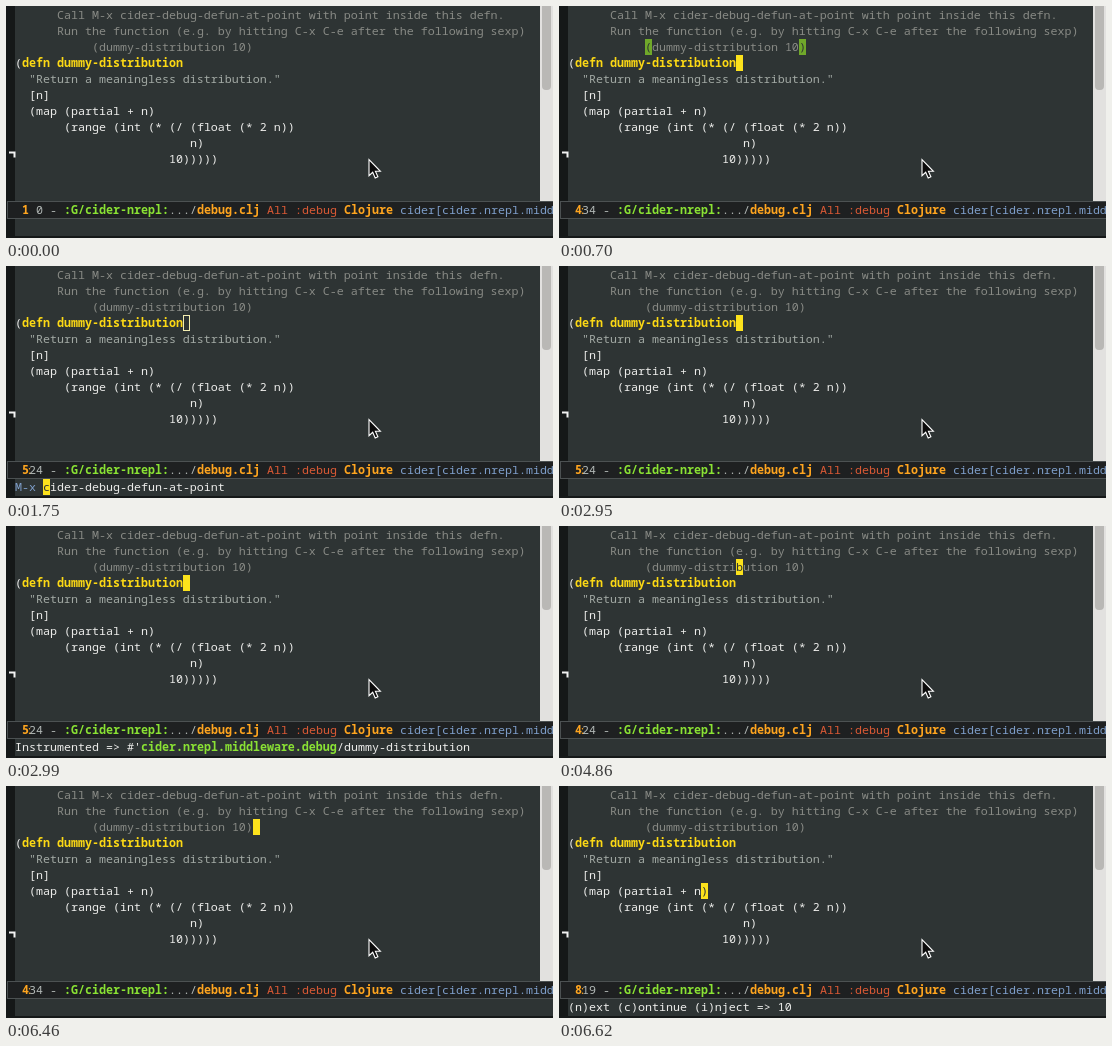
Recreate the animation shown at these times as an HTML page. Size 547 px wide and 232 px high, loop 8 s.

```html
<!DOCTYPE html>
<html lang="en">
<head>
<meta charset="utf-8">
<title>Editor debugging session</title>
<style>
  html, body { margin: 0; width: 100%; height: 100%; overflow: hidden; background: #111; }
  svg { display: block; width: 547px; height: 232px; }
  text { font: 11.6667px "Noto Sans Mono", "DejaVu Sans Mono", monospace; white-space: pre; }
  .b { font-weight: 700; }
</style>
</head>
<body>
<svg id="stage" viewBox="0 0 547 232" xmlns="http://www.w3.org/2000/svg">
  <rect width="547" height="232" fill="#151818"/>
  <rect x="9" width="525" height="195" fill="#2e3434"/>
  <rect x="9" y="213" width="538" height="17" fill="#2e3434"/>
  <path d="M3 146.5h5.5v5" fill="none" stroke="#f2f2f2" stroke-width="2"/>
  <rect x="534" width="13" height="195" fill="#e2e1df"/>
  <path d="M536 0h9v80a4 4 0 0 1-4 4h-1a4 4 0 0 1-4-4z" fill="#b9b8b5"/>
  <rect x="1.5" y="195.5" width="560" height="17" fill="#1e2021" stroke="#4c5152"/>
  <g id="body"></g>
  <g id="mode"></g>
  <g id="live"></g>
  <path d="M363 153.5v16.2l3.7-3.4 2.5 5.7 2.7-1.2-2.5-5.5h5z" fill="#0b0b0b" stroke="#fff" stroke-width="1.1"/>
</svg>
<script>
const NS = "http://www.w3.org/2000/svg";
const LOOP = 8000, CW = 7, LEFT = 9;
const BG = "#2e3434", FG = "#eeeeec", DIM = "#888a85", STR = "#a3aaa5", GOLD = "#fcd814",
      GREEN = "#8ae234", ORANGE = "#ffa51f", RED = "#dc5a35", BLUE = "#7f9fcb",
      GRAY = "#b4bab8", CURSOR = "#fce21c", MATCH = "#70a82a";
const body = document.getElementById("body");
const mode = document.getElementById("mode");
const live = document.getElementById("live");

function add(parent, tag, attrs, str) {
  const el = document.createElementNS(NS, tag);
  for (const k in attrs) el.setAttribute(k, attrs[k]);
  if (str) el.textContent = str;
  parent.appendChild(el);
}
const colX = col => LEFT + col * CW;
const lineY = line => 1 + (line - 2) * 16;
const put = (parent, str, col, y, fill, bold) =>
  add(parent, "text", { x: colX(col), y, fill, class: bold ? "b" : "" }, str);
const cell = (col, y, fill) =>
  add(live, "rect", { x: colX(col), y, width: CW, height: 16, fill });

// Buffer text: line, column, string, colour, bold
const code = [
  [2, 6, "Call M-x cider-debug-defun-at-point with point inside this defn.", DIM],
  [3, 6, "Run the function (e.g. by hitting C-x C-e after the following sexp)", DIM],
  [4, 11, "(dummy-distribution 10)", DIM],
  [5, 0, "(", FG],
  [5, 1, "defn", GOLD, 1],
  [5, 6, "dummy-distribution", GOLD, 1],
  [6, 2, "\"Return a meaningless distribution.\"", STR],
  [7, 2, "[n]", FG],
  [8, 2, "(map (partial + n)", FG],
  [9, 7, "(range (int (* (/ (float (* 2 n))", FG],
  [10, 25, "n)", FG],
  [11, 22, "10)))))", FG]
];
for (const [line, col, str, fill, bold] of code) put(body, str, col, lineY(line) + 12, fill, bold);

function charAt(line, col) {
  for (const [l, c, str] of code)
    if (l === line && col >= c && col < c + str.length) return str[col - c];
  return "";
}

// Mode line: column, string, colour, bold
const modeParts = [
  [5, "-", GRAY],
  [7, ":G/cider-nrepl:", GREEN, 1],
  [22, ".../", GRAY],
  [26, "debug.clj", ORANGE, 1],
  [36, "All", RED],
  [40, ":debug", RED],
  [47, "Clojure", ORANGE, 1],
  [55, "cider[cider.nrepl.middleware", BLUE]
];
for (const [col, str, fill, bold] of modeParts) put(mode, str, col, 208, fill, bold);

// Echo area contents: column, string, colour, bold
const echoes = {
  none: [],
  prompt: [[0, "M-x", BLUE]],
  recall: [[0, "M-x", BLUE], [4, "cider-macroexpand-expression", FG]],
  command: [[0, "M-x", BLUE], [4, "cider-debug-defun-at-point", FG]],
  done: [[0, "Instrumented => #'", FG], [18, "cider.nrepl.middleware.debug", GREEN, 1],
         [46, "/dummy-distribution", FG]],
  args: [[0, "dummy-distribution", GOLD, 1], [18, ": ([n])", FG]],
  debug: [[0, "(n)ext (c)ontinue (i)nject => 10", FG]]
};

// Each step changes only the listed fields
const steps = [
  [0, { point: [1, 0], shown: [1, 0], echo: "none", mini: false, match: false }],
  [500, { point: [4, 34] }],
  [560, { shown: [4, 34] }],
  [630, { match: true }],
  [690, { point: [5, 24] }],
  [750, { match: false }],
  [820, { shown: [5, 24] }],
  [1170, { mini: true }],
  [1210, { echo: "prompt" }],
  [1620, { echo: "recall" }],
  [1750, { echo: "command" }],
  [2950, { echo: "none", mini: false }],
  [2990, { echo: "done" }],
  [4860, { point: [4, 24], shown: [4, 24], echo: "none" }],
  [5360, { point: [4, 34] }],
  [5400, { shown: [4, 34] }],
  [5440, { echo: "args" }],
  [5600, { match: true }],
  [5930, { echo: "none" }],
  [6460, { match: false }],
  [6510, { point: [8, 19] }],
  [6560, { shown: [8, 19] }],
  [6620, { echo: "debug" }]
];

function drawCursor([line, col], hollow) {
  if (line < 2) return;
  const y = lineY(line);
  if (hollow) {
    add(live, "rect", { x: colX(col) + .5, y: y + .5, width: CW - 1, height: 15,
                        fill: "none", stroke: "#f3edb0" });
    return;
  }
  cell(col, y, CURSOR);
  put(live, charAt(line, col), col, y + 12, BG);
}

function draw(s) {
  live.replaceChildren();
  if (s.match) for (const col of [11, 33]) {
    cell(col, lineY(4), MATCH);
    put(live, charAt(4, col), col, lineY(4) + 12, BG);
  }
  drawCursor(s.point, s.mini);

  const [line, col] = s.shown;
  put(live, String(line), 1, 208, ORANGE, true);
  put(live, String(col).padStart(2), 2, 208, GRAY);
  if (col > 9) add(live, "text", { x: 20, y: 208, fill: ORANGE }, ":");

  const text = echoes[s.echo];
  for (const [c, str, fill, bold] of text) put(live, str, c, 225, fill, bold);
  if (s.mini) {
    cell(4, 213, CURSOR);
    if (text[1]) put(live, text[1][1][0], 4, 225, BG);
  }
}

const start = performance.now();
let last = -1;
function render() {
  const t = Math.max(0, performance.now() - start) % LOOP;
  const n = steps.filter(step => step[0] <= t).length;
  if (n !== last) {
    draw(Object.assign({}, ...steps.slice(0, n).map(step => step[1])));
    last = n;
  }
  requestAnimationFrame(render);
}
render();
</script>
</body>
</html>
```
